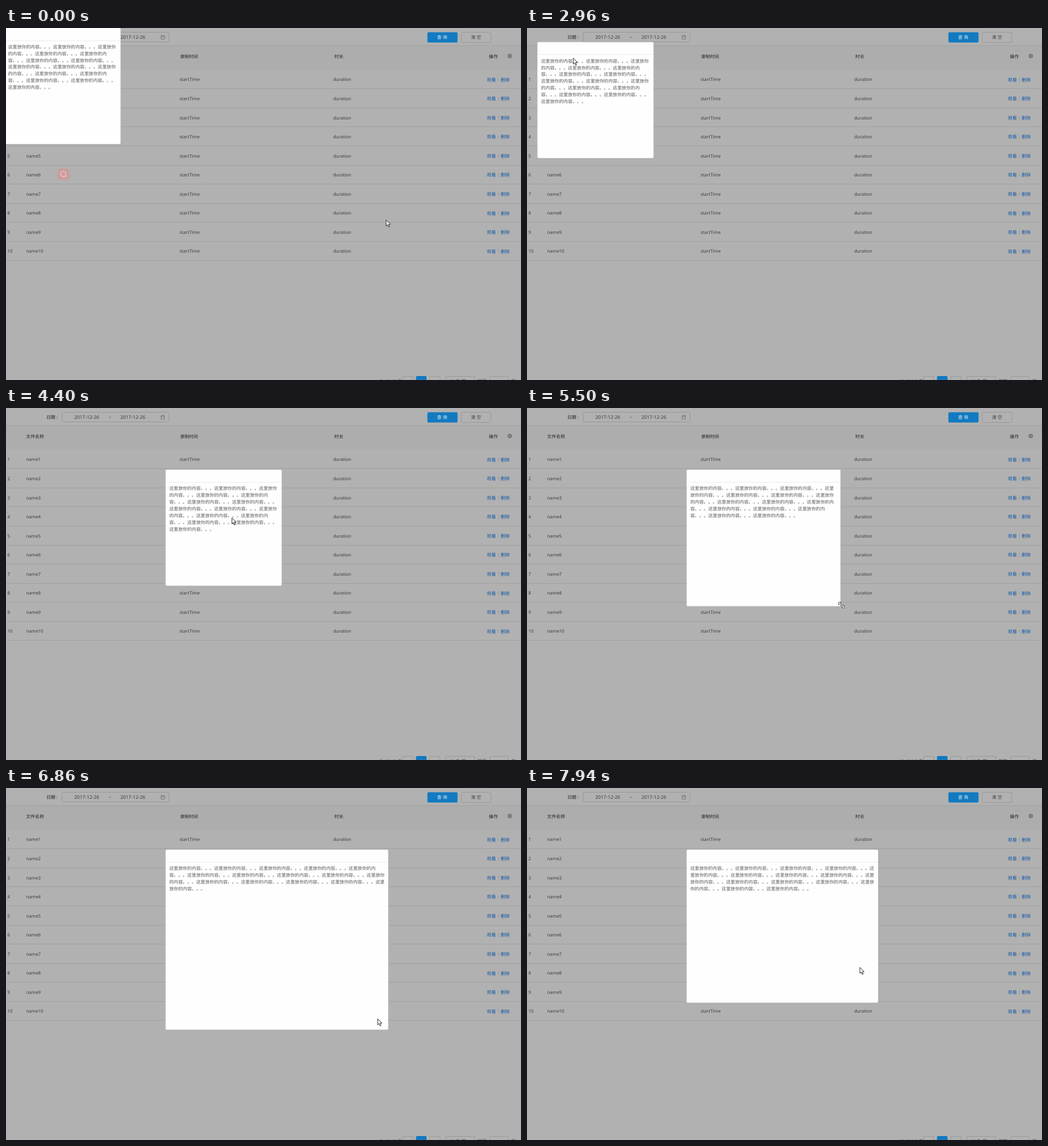
Recreate the animation shown at these times as an HTML page with a canvas. Size 905 by 619 pixels, loop 8000 ms.

```html
<!DOCTYPE html>
<html lang="zh-CN">
<head>
<meta charset="utf-8">
<title>Draggable dialog</title>
<style>
html, body { margin: 0; width: 100%; height: 100%; overflow: hidden; background: #b1b1b1; }
canvas { display: block; }
</style>
</head>
<body>
<canvas id="stage" width="905" height="619"></canvas>
<script>
const ctx = document.getElementById('stage').getContext('2d');
const LOOP = 8000;
const EM = 7.88;
const HEADER = 22;
const FONT = '"Noto Sans", "Noto Sans CJK SC", "Noto Sans CJK", sans-serif';
const LINE = '#a0a0a0', EDGE = '#989898', BLUE = '#117ac0', LINK = '#0f59a8';
const INK = '#3e3e3e', DARK = '#222';
const UNITS = '这里放你的内容。。。'.repeat(15).match(/.。*/g);

const initial = { place: [-2.7, 0], size: [204, 204], pointer: [668, 337.5] };

// Each move runs in even steps; ease and lead are exponents for the dialog and the pointer.
const moves = [
  { from: 280, until: 580, steps: 3, pointer: [654, 347] },
  { from: 1290, until: 1680, steps: 4, pointer: [144, 218] },
  { from: 1990, until: 2680, steps: 6, pointer: [51, 15.5] },
  { from: 2960, until: 3740, steps: 7, place: [136, 107], pointer: [203, 122.5], ease: [0.97, 0.75], lead: [0.83, 0.54] },
  { from: 3860, until: 4140, steps: 3, place: [280.5, 108.5], pointer: [347, 124] },
  { from: 4270, until: 4790, steps: 5, pointer: [472, 297] },
  { from: 5070, until: 5070, steps: 1, pointer: [482, 311] },
  { from: 5500, until: 6160, steps: 6, size: [519.3, 399.5], pointer: [794, 502], ease: [0.87, 0.945], lead: [0.83, 0.94] },
  { from: 6440, until: 6440, steps: 1, pointer: [791, 501.5] },
  { from: 6575, until: 7250, steps: 6, size: [263, 233.7], pointer: [551, 335], lead: [0.8, 0.8] },
  { from: 7400, until: 7660, steps: 3, size: [466.5, 370.5], pointer: [740, 472] },
  { from: 7800, until: 7940, steps: 2, size: [336.5, 269], pointer: [585, 315.5] }
];

function progress(t, { from, until, steps }) {
  const gap = (until - from) / (steps - 1) || 1;
  const done = Math.floor((t - from) / gap + 1e-6) + 1;
  return Math.min(Math.max(done, 0), steps) / steps;
}

function stateAt(t) {
  const state = { ...initial };
  for (const move of moves) {
    const p = progress(t, move);
    for (const key in initial) {
      if (!move[key]) continue;
      const power = (key === 'pointer' ? move.lead : move.ease) || [1, 1];
      state[key] = state[key].map((v, i) => v + (move[key][i] - v) * p ** power[i]);
    }
  }
  return state;
}

// The pointer shape follows from where it is on the dialog.
function pointerShape({ place: [x, y], size: [w, h], pointer: [px, py] }) {
  const right = Math.abs(px - x - w) < 8, bottom = Math.abs(py - y - h) < 7;
  const inX = px > x && px < x + w + 8, inY = py > y && py < y + h + 7;
  if (right && bottom) return 'nwse';
  if (bottom && inX) return 'ns';
  if (right && inY) return 'ew';
  return inX && inY && py < y + HEADER ? 'move' : 'arrow';
}

function label(str, x, cy, color = INK, px = EM) {
  ctx.font = px + 'px ' + FONT;
  ctx.textRendering = 'geometricPrecision';
  ctx.fillStyle = color;
  ctx.fillText(str, x, cy + 2.9);
}

function box(x, y, w, h, r, fill, stroke) {
  ctx.beginPath();
  ctx.roundRect(x, y, w, h, r);
  if (fill) { ctx.fillStyle = fill; ctx.fill(); }
  if (stroke) { ctx.strokeStyle = stroke; ctx.lineWidth = 1; ctx.stroke(); }
}

function rule(y) {
  ctx.fillStyle = LINE;
  ctx.fillRect(0, y, 905, 1);
}

function ring(x, y, r, color, width) {
  ctx.strokeStyle = color;
  ctx.lineWidth = width;
  ctx.beginPath();
  ctx.arc(x, y, r, 0, 7);
  ctx.stroke();
}

function strokeLine(x1, y1, x2, y2, color, width) {
  ctx.strokeStyle = color;
  ctx.lineWidth = width;
  ctx.beginPath();
  ctx.moveTo(x1, y1);
  ctx.lineTo(x2, y2);
  ctx.stroke();
}

function drawToolbar() {
  label('日期 :', 71, 16.3, DARK);
  box(98.5, 7.5, 188, 17, 2, null, EDGE);
  label('2017-12-26', 120, 16.3, INK, 8.4);
  label('~', 180.5, 16.3);
  label('2017-12-26', 201, 16.3, INK, 8.4);
  box(272.5, 13.5, 6, 6, 0.5, null, '#747474');
  strokeLine(272.5, 15.5, 278.5, 15.5, '#747474', 0.8);
  for (const x of [274, 277]) strokeLine(x, 12, x, 14, '#747474', 0.8);
  box(740.5, 7.5, 53, 18, 2, BLUE);
  label('查 询', 757.5, 16.4, '#eef2f6');
  box(800, 7.5, 52, 18, 2, null, EDGE);
  label('清 空', 817, 16.4);
}

function drawTable() {
  ctx.fillStyle = '#adadad';
  ctx.fillRect(0, 31, 905, 42);
  rule(30.5);
  label('文件名称', 35.3, 49.9, DARK);
  label('录制时间', 306, 49.9, DARK);
  label('时长', 577, 49.9, DARK);
  label('操作', 848.5, 49.9, DARK);
  ring(885.3, 49.3, 3.3, '#444', 0.9);
  ring(885.3, 49.3, 1.3, '#444', 0.9);
  for (let i = 0; i < 10; i++) {
    const y = 90.5 + 33.55 * i;
    label(i + 1, 2.5, y);
    label('name' + (i + 1), 35.5, y);
    label('startTime', 305, y);
    label('duration', 575, y);
    label('观看', 845, y + 0.3, LINK);
    label('删除', 869.3, y + 0.3, LINK);
    ctx.fillStyle = '#959595';
    ctx.fillRect(865, y - 3, 1, 6);
    rule(Math.floor(y + 16.3));
  }
}

function drawPager() {
  const y = 621;
  label('共 10/10 条', 655, y);
  box(697, 612.5, 18, 18, 2, null, EDGE);
  box(720.5, 612, 18.5, 19, 2, BLUE);
  label('1', 727.6, y, '#dde6ee');
  box(744.5, 612.5, 18, 18, 2, null, EDGE);
  box(773, 612.5, 50.5, 18, 2, null, EDGE);
  label('10 条/页', 779, y);
  label('跳至', 828.5, y);
  box(850.5, 612.5, 32, 18, 2, null, EDGE);
  label('页', 888, y);
}

function drawSearchBadge() {
  box(91, 247.5, 20, 19.5, 4, '#cb9c9b');
  ring(100.8, 256.8, 4.6, '#e2d3d3', 1.3);
  strokeLine(103.8, 260, 106.3, 262.3, '#e2d3d3', 1.3);
}

function wrap(width) {
  const max = Math.floor(width / EM), lines = [''];
  for (const unit of UNITS) {
    const last = lines.length - 1;
    if (lines[last].length + unit.length > max) lines.push(unit);
    else lines[last] += unit;
  }
  return lines;
}

function drawDialog({ place: [x, y], size: [w, h] }) {
  box(x, y, w, h, 2, '#fefefe');
  ctx.fillStyle = '#ebebeb';
  ctx.fillRect(x, Math.floor(y + HEADER), w, 1);
  // One full-width cell per character, so that repeated stops are not kerned together.
  wrap(w - 12.8).forEach((line, row) =>
    [...line].forEach((ch, col) => label(ch, x + 6.4 + col * EM, y + 33 + row * 11.85, '#555')));
}

function polygon(points) {
  const path = new Path2D();
  points.forEach(([x, y]) => path.lineTo(x, y));
  path.closePath();
  return path;
}

const arrow = polygon([[0, 0], [0, 10.6], [2.4, 8.4], [4.2, 12.4], [5.9, 11.6], [4.2, 7.8], [7.4, 7.6]]);
const half = [[-7, 0], [-4.2, -2.6], [-4.2, -0.7], [4.2, -0.7], [4.2, -2.6]];
const doubleArrow = polygon([...half, ...half.map(([x, y]) => [-x, -y])]);
const turns = { ew: [0], ns: [Math.PI / 2], nwse: [Math.PI / 4], move: [0, Math.PI / 2] };

function drawPointer(shape, [x, y]) {
  ctx.save();
  ctx.translate(x, y);
  ctx.strokeStyle = '#111';
  ctx.fillStyle = '#fff';
  ctx.lineJoin = 'round';
  if (shape === 'arrow') {
    ctx.lineWidth = 0.9;
    ctx.fill(arrow);
    ctx.stroke(arrow);
  } else {
    ctx.lineWidth = 1.2;
    for (const paint of ['stroke', 'fill'])
      for (const angle of turns[shape]) {
        ctx.save();
        ctx.rotate(angle);
        ctx[paint](doubleArrow);
        ctx.restore();
      }
  }
  ctx.restore();
}

function render(now) {
  const t = now % LOOP;
  const state = stateAt(t);
  ctx.fillStyle = '#b1b1b1';
  ctx.fillRect(0, 0, 905, 619);
  drawToolbar();
  drawTable();
  drawPager();
  if (t < 2960) drawSearchBadge();
  drawDialog(state);
  drawPointer(pointerShape(state), state.pointer);
}

const start = performance.now();
function tick() {
  render(performance.now() - start);
  requestAnimationFrame(tick);
}
tick();
</script>
</body>
</html>
```
